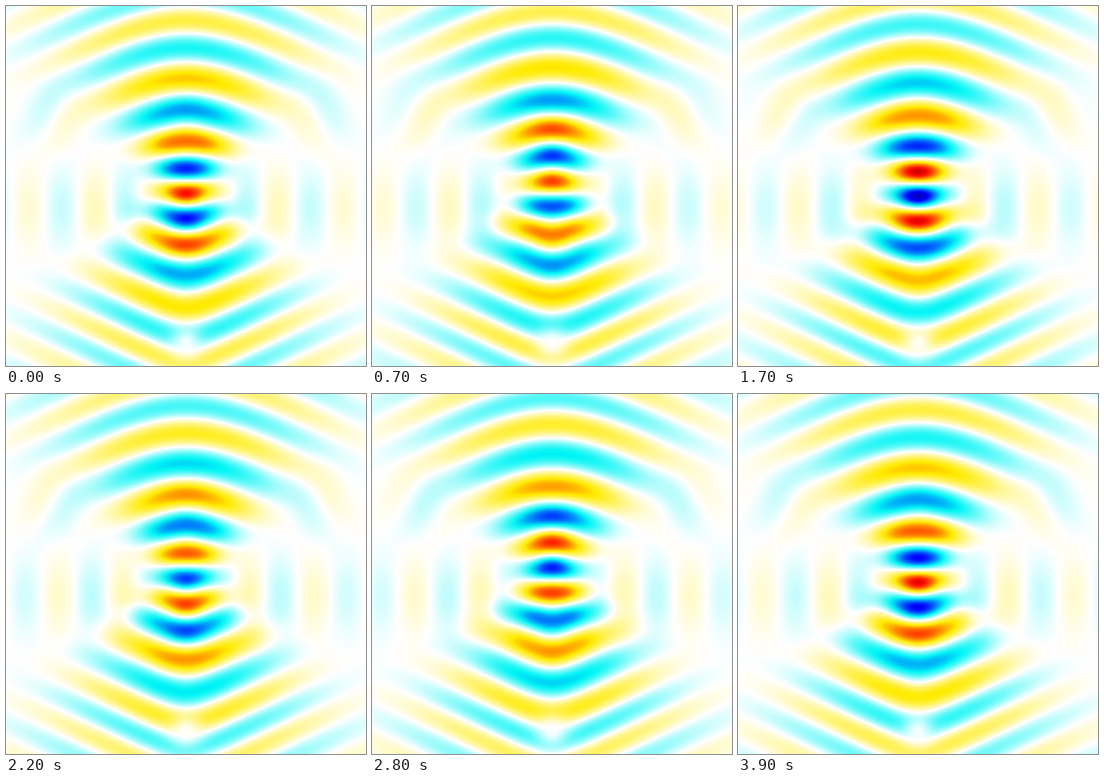
Write a matplotlib script that moves like this. It is 360 px wide and 360 px high and loops after 4 s.

```python
import numpy as np
import matplotlib.pyplot as plt
from matplotlib.animation import FuncAnimation
from matplotlib.colors import LinearSegmentedColormap

SIZE, FRAMES, INTERVAL = 360, 40, 100
MID = (SIZE - 1) / 2


def cycles(turns):
    """Unit phasor for a phase counted in whole turns."""
    return np.exp(2j * np.pi * turns)


def bell(value, width):
    return np.exp(-(value / width) ** 2)


def focused_beam(x, z):
    """Upward beam with its waist at the middle of the stage."""
    # Wavefronts bend down above the focus and up below it
    rounding = 20 + 0.3 * np.maximum(z, 0)
    bend = 0.48 * (np.hypot(x, rounding) - rounding)
    depth = z + np.tanh(z / 25) * bend
    phase = 0.11 + 0.0177 * depth + 0.07 * np.sin(2 * np.pi * depth / 190)

    height = 0.76 * (1 + (z / 95) ** 2) ** -0.75
    spread = np.hypot(18, 0.6 * z)
    height = height * np.exp(-0.5 * (x / spread) ** 2)
    gap = 1 - 0.95 * bell(x, 16) * bell(z + 157, 16)

    # A weak counter-wave makes the crests pulse near the focus
    echo = 1 - 0.22 * bell(z, 70) * bell(x, 25) * cycles(-z / 24.2)
    return height * gap * echo * cycles(phase)


def side_lobes(x, z):
    """Faint spots drifting outward on both sides."""
    low = 0.16 * np.exp(-x / 170) * (1 - np.exp(-(x / 50) ** 4))
    low = low * bell(z + 22, 38) * cycles(x / 66 - 0.394)
    high = 0.08 * bell(x - 132, 32) * bell(z - 70, 32)
    high = high * cycles((x - 135) / 90 + (z - 75) / 140 + 0.35)
    return low + high


pixels = np.arange(SIZE) - MID
x, z = np.meshgrid(np.abs(pixels), -pixels)
field = focused_beam(x, z) + side_lobes(x, z)

stops = [(-1, (0, 0, 128)), (-.75, (0, 0, 255)), (-.36, (0, 245, 245)),
         (0, (255, 255, 255)), (.36, (255, 235, 0)), (.75, (255, 10, 0)),
         (1, (128, 0, 0))]
cmap = LinearSegmentedColormap.from_list(
    "wave", [((v + 1) / 2, tuple(c / 255 for c in rgb)) for v, rgb in stops],
    N=512)

fig = plt.figure(figsize=(3.6, 3.6), dpi=100)
ax = fig.add_axes([0, 0, 1, 1])
ax.axis("off")
image = ax.imshow(field.real, cmap=cmap, vmin=-1, vmax=1,
                  interpolation="nearest", aspect="auto")


def draw(frame):
    image.set_data((field * cycles(-frame / FRAMES)).real)
    return [image]


anim = FuncAnimation(fig, draw, frames=FRAMES, interval=INTERVAL,
                     repeat=True, repeat_delay=0)
plt.show()
```
